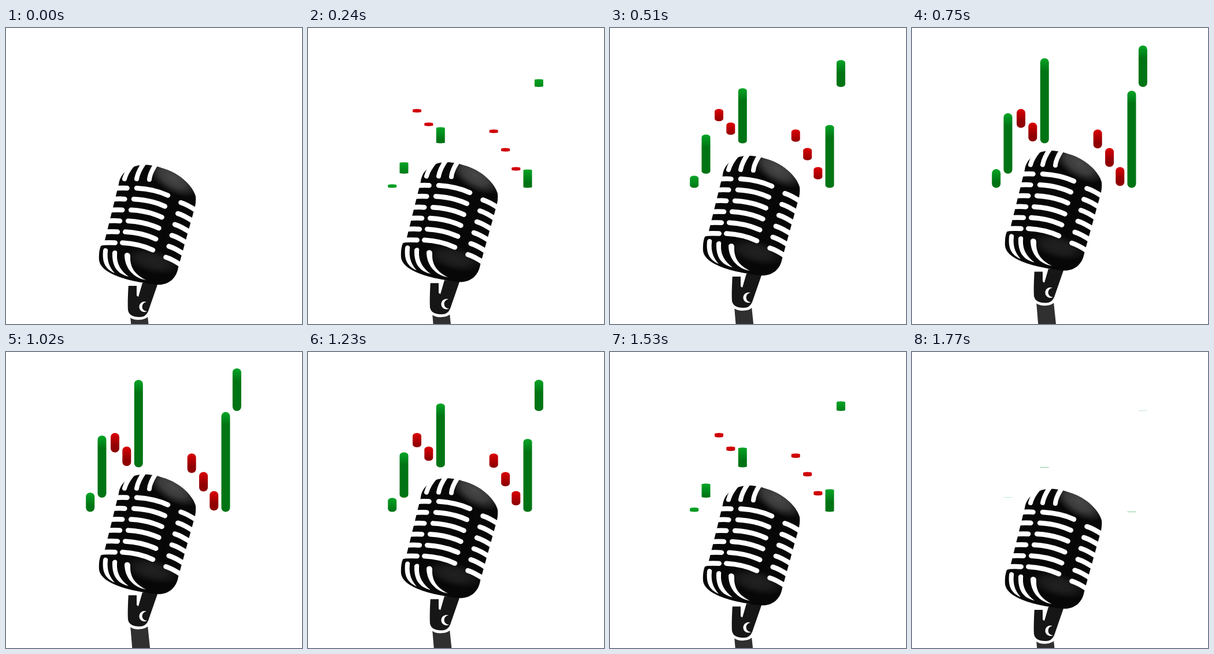
These frames come from a looping animation (512x512 px, 1800 ms). An HTML page:

```html
<!DOCTYPE html>
<html lang="en">
<head>
<meta charset="utf-8">
<title>Microphone and level bars</title>
<style>
html, body { margin: 0; width: 100%; height: 100%; overflow: hidden; background: #fff; }
svg { display: block; width: 100vw; height: 100vh; }
.slats { fill: none; stroke: #fff; stroke-width: 8.5; stroke-linecap: round; }
</style>
</head>
<body>
<svg viewBox="0 0 512 512">
  <defs>
    <linearGradient id="green" gradientUnits="userSpaceOnUse" x2="0" y2="22">
      <stop stop-color="#06a526"/><stop offset="1" stop-color="#007414"/>
    </linearGradient>
    <linearGradient id="red" gradientUnits="userSpaceOnUse" x2="0" y2="22">
      <stop stop-color="#dc0006"/><stop offset="1" stop-color="#900002"/>
    </linearGradient>
    <radialGradient id="shine">
      <stop stop-color="#484848"/><stop offset=".5" stop-color="#3a3a3a"/>
      <stop offset="1" stop-color="#3a3a3a" stop-opacity="0"/>
    </radialGradient>
    <clipPath id="inside"><use href="#body"/></clipPath>
  </defs>
  <g id="mic">
    <path fill="#303030" d="M215 497Q231 508 245 497L250 545H219Z"/>
    <path fill="#161616" d="M212 440H263L246 489Q242 499 231 499Q213 499 211 487Q210 474 212 440Z"/>
    <path fill="none" stroke="#fff" stroke-width="3.5" d="M212 495Q219 503 231 502Q242 502 249 493"/>
    <path fill="#fff" d="M211 438L236 440L229 464L226 462V445H211Z"/>
    <path fill="#fff" d="M243 473A9 9 0 1 0 244 489A8 8 0 0 1 243 473Z"/>
    <path id="body" fill="#070707" d="M195 269C197 251 214 237 236 236C251 235 263 239 272 242C300 250 323 272 328 290Q329 298 327 308L298 413C295 432 281 444 262 443C246 442 228 438 218 436C192 430 164 419 161 401Q160 386 164 376L169 374Z"/>
    <g clip-path="url(#inside)" fill="url(#shine)">
      <ellipse cx="289" cy="258" rx="50" ry="25" transform="rotate(32 289 258)"/>
      <ellipse cx="253" cy="402" rx="50" ry="21" transform="rotate(14 253 402)" opacity=".4"/>
    </g>
    <g class="slats">
      <path stroke-width="8" d="M205 260Q208 248 220 234M226 260Q228 248 239 232M248 261Q249 249 261 232"/>
      <path id="slats"/>
    </g>
    <g fill="#fff">
      <path d="M168 384Q169 379 173 380Q177 381 176 385C174 403 180 414 188 423C172 416 166 405 168 384Z"/>
      <path d="M184 387Q186 383 190 384Q193 385 192 390C191 408 199 419 212 429C192 424 183 411 184 387Z"/>
      <path d="M205 391Q207 387 211 388Q215 389 215 394C214 414 224 426 242 435C220 431 205 414 205 391Z"/>
    </g>
  </g>
  <g id="bars"></g>
</svg>
<script>
const PERIOD = 1800, STEP = 30, REST = 1, LIFT = 26.5;
const $ = id => document.getElementById(id);
const setAll = (el, attrs) => {
  for (const k in attrs) el.setAttribute(k, attrs[k]);
};

// Six rows of slats: left edge, centre, right edge
let d = '';
for (let i = 0; i < 6; i++) {
  const x = -5.2 * i, y = 18.9 * i;
  d += `M${186 + x} ${277 + y}Q${198 + x} ${275 + y} ${209.5 + x * 0.8} ${276 + y}`
    + `M${226 + x * 0.95} ${276 + y}Q${256 + x} ${277.5 + y} ${280 + x} ${288.5 + y}`
    + `M${302.5 + x} ${301 + y}Q${313 + x} ${304 + y} ${331 + x} ${316 + y}`;
}
$('slats').setAttribute('d', d);

// Centre x, fixed end y, full height (negative grows upward)
const bars = [
  [145.7, 276.5, -35], [166, 252, -113], [188.5, 140, 35.5], [208.8, 163.5, 35.5],
  [229.3, 199.5, -159], [321.2, 175.5, 35.5], [341.6, 207.5, 35.5],
  [359.8, 240.5, 35.5], [380, 276.5, -181.5], [399.4, 102, -77.5]
].map(([x, y, h]) => {
  const el = document.createElementNS('http://www.w3.org/2000/svg', 'rect');
  setAll(el, { x: x - 7.5, width: 15, rx: 7.5, fill: `url(#${h < 0 ? 'green' : 'red'})` });
  $('bars').append(el);
  return { el, y, h };
});

function draw(now) {
  const t = Math.floor(now % PERIOD / STEP) * STEP;
  const p = 1 - Math.abs(1 - t / (PERIOD / 2));
  const s = p * p * (3 - 2 * p);
  $('mic').setAttribute('transform', `translate(0 ${REST - LIFT * s})`);
  // The shading keeps its length below each bar's top while the caps flatten
  for (const { el, y, h } of bars) {
    setAll(el, {
      transform: `translate(0 ${y + Math.min(h * s, 0)})`,
      height: Math.abs(h * s), ry: 7.5 * s
    });
  }
}

const start = performance.now();
function loop() {
  draw(performance.now() - start);
  requestAnimationFrame(loop);
}
loop();
</script>
</body>
</html>
```
